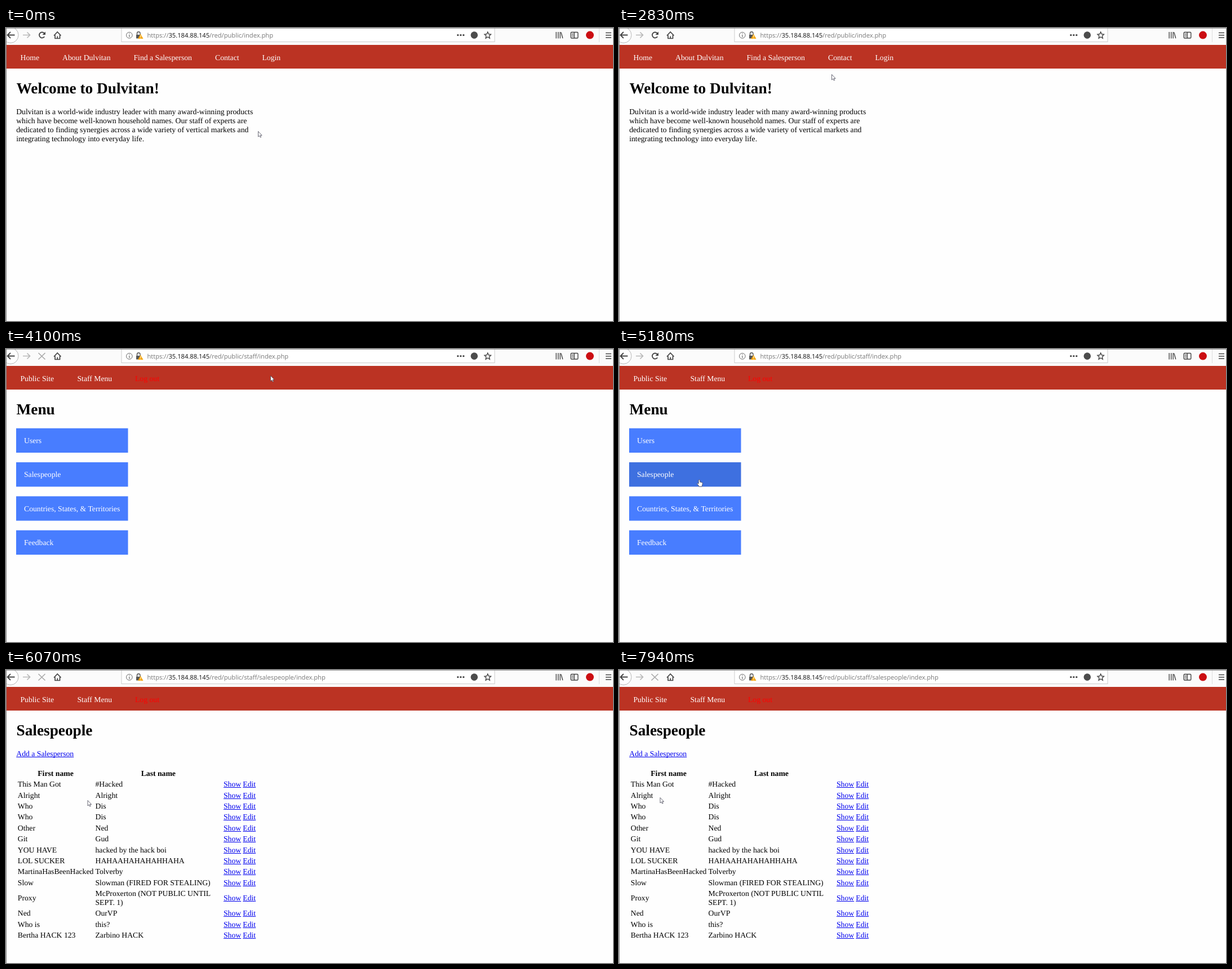
An HTML page with a canvas that plays this animation: 1077 by 520 pixels, repeating every 8000 ms.

```html
<!DOCTYPE html>
<html lang="en">
<head>
<meta charset="utf-8">
<title>Staff site walkthrough</title>
<style>
html, body { margin: 0; width: 100%; height: 100%; overflow: hidden; background: #fefefe; }
canvas { display: block; }
</style>
</head>
<body>
<canvas id="stage" width="1077" height="520"></canvas>
<script>
const ctx = document.getElementById('stage').getContext('2d');
const LOOP = 8000, STEP = 120;
const SERIF = '"Liberation Serif", serif';
const BODY = `13.7px ${SERIF}`, BOLD = `bold 13.7px ${SERIF}`, TITLE = `bold 27.3px ${SERIF}`;
const URL_FONT = '11.15px "Open Sans", sans-serif';
const INK = '#444', LINK = '#00e';

const STAFF_AT = 4100, SALES_AT = 6070;

// Pointer legs: start time, number of steps, curve control point, end point
const START = [447.5, 183.5];
const LEGS = [
  [1000, 7, 400, 150, 349.5, 119.5],
  [1840, 2, 334, 110, 317.5, 103.5],
  [2110, 3, 285, 97, 264.5, 88],
  [2470, 4, 310, 69, 377.5, 82.5],
  [2980, 5, 430, 62, 468, 48],
  [STAFF_AT, 1, 469, 48, 469.5, 47.5],
  [4220, 3, 400, 82, 328.5, 122],
  [4580, 6, 220, 185, 142.5, 232],
  [SALES_AT, 1, 144, 231, 145, 231.5],
  [6190, 3, 151, 233, 158, 234.5],
  [6680, 2, 170, 237, 178, 238],
  [6950, 6, 90, 200, 29.5, 214.5],
  [7700, 3, 50, 219, 73, 226.5]
];

const ROWS = [
  ['This Man Got', '#Hacked'], ['Alright', 'Alright'], ['Who', 'Dis'], ['Who', 'Dis'],
  ['Other', 'Ned'], ['Git', 'Gud'], ['YOU HAVE', 'hacked by the hack boi'],
  ['LOL SUCKER', 'HAHAAHAHAHAHHAHA'], ['MartinaHasBeenHacked', 'Tolverby'],
  ['Slow', 'Slowman (FIRED FOR STEALING)'],
  ['Proxy', 'McProxerton (NOT PUBLIC UNTIL', 'SEPT. 1)'],
  ['Ned', 'OurVP'], ['Who is', 'this?'], ['Bertha HACK 123', 'Zarbino HACK']
];

function pointerAt(time) {
  let [x, y] = START;
  for (const [start, steps, cx, cy, ex, ey] of LEGS) {
    if (time < start) break;
    const u = Math.min(1, (Math.floor((time - start) / STEP) + 1) / steps), v = 1 - u;
    x = v * v * x + 2 * u * v * cx + u * u * ex;
    y = v * v * y + 2 * u * v * cy + u * u * ey;
  }
  return [x, y];
}

function text(str, x, y, color = '#000', font = BODY, align = 'left') {
  ctx.font = font;
  ctx.fillStyle = color;
  ctx.textAlign = align;
  ctx.fillText(str, x, y);
}

function link(str, x, y) {
  text(str, x, y, LINK);
  rect(x, Math.round(y) + 1, ctx.measureText(str).width, 1, LINK);
}

function rect(x, y, w, h, color) {
  ctx.fillStyle = color;
  ctx.fillRect(x, y, w, h);
}

function line(path, color = INK, width = 1.6) {
  ctx.strokeStyle = color;
  ctx.lineWidth = width;
  ctx.stroke(new Path2D(path));
}

function shape(path, color) {
  ctx.fillStyle = color;
  ctx.fill(new Path2D(path));
}

function disc(x, y, r, fill, stroke) {
  ctx.beginPath();
  ctx.arc(x, y, r, 0, Math.PI * 2);
  if (fill) { ctx.fillStyle = fill; ctx.fill(); }
  if (stroke) { ctx.strokeStyle = stroke; ctx.lineWidth = 1; ctx.stroke(); }
}

function drawReload(time) {
  const arriving = (time >= 3860 && time < STAFF_AT) || (time >= 5950 && time < SALES_AT);
  const stopped = (time >= STAFF_AT && time < 4700) || time >= SALES_AT;
  if (arriving) line('M57.5 7.5L66.5 16', '#666', 1.5);
  else if (stopped) line('M57.5 7L69.5 18.5M69.5 7L57.5 18.5', '#aaa', 1.7);
  else {
    line('M68.2 15.2A5 5 0 1 1 67.6 9', INK, 1.8);
    shape('M70 6.5V12H64.5Z', INK);
  }
}

function drawUrl(time) {
  const path = time < 3860 ? '' : time < 5950 ? 'staff/' : 'staff/salespeople/';
  let x = 250.5;
  for (const [part, color] of [['https://', '#777'], ['35.184.88.145', '#111'], [`/red/public/${path}index.php`, '#777']]) {
    text(part, x, 17, color, URL_FONT);
    x += ctx.measureText(part).width;
  }
}

function drawToolbar(time) {
  rect(0, 0, 1077, 30, '#fbfbfb');
  disc(8, 12.5, 14, '#fff', '#b5b5b5');
  line('M15.5 12.5H2.5M8 7L2.5 12.5L8 18', INK, 1.8);
  line('M30 12.5H42.5M37.5 7.5L42.5 12.5L37.5 17.5', '#b8b8b8', 1.7);
  drawReload(time);
  line('M85 13.5L91.2 7L97.5 13.5M87 12.5V18.5H95.5V12.5M91.2 18.5V14.5', INK, 1.7);

  rect(204.5, 0, 663, 25, '#ccc');
  rect(205.5, 1, 661, 23, '#fff');
  disc(218.8, 12.8, 5.3, null, '#666');
  line('M218.8 12V16M218.8 9.3V10.6', '#666', 1.2);
  line('M232.5 12V9.5A2.7 2.7 0 0 1 238 9.5V12', '#555', 1.4);
  rect(231, 12, 8, 6.5, '#555');
  shape('M238.7 10.5L243.5 19H234Z', '#f5a50a');
  line('M238.8 13V16M238.8 17V18', '#fff', 1);
  drawUrl(time);
  for (const x of [801.8, 806.8, 811.8]) disc(x, 12.6, 1.7, INK);
  disc(830.8, 12.6, 6.3, '#4c4c4c');
  line('M854.7 7L856.4 10.8L860.4 11.2L857.4 14L858.3 18.2L854.7 16L851.1 18.2L852 14L849 11.2L853 10.8Z', INK, 1.4);

  line('M976.2 7V18.5M979.7 7V18.5M983.2 7V18.5M984.8 7.5L987.8 18.3', INK, 1.4);
  line('M1003.5 7.5H1013.5Q1014.8 7.5 1014.8 9V16.5Q1014.8 18 1013.5 18H1003.5Q1002.3 18 1002.3 16.5V9Q1002.3 7.5 1003.5 7.5M1008.3 7.5V18', INK, 1.4);
  line('M1004 10.2H1007M1004 12.6H1007M1004 15H1007', INK, 1);
  disc(1036, 12.6, 7, '#cb0d12');
  rect(1052, 0, 1, 25, '#ddd');
  line('M1064 8.5H1074M1064 12.7H1074M1064 16.9H1074', INK, 1.5);
}

function drawNav(items) {
  rect(0, 30, 1077, 42, '#bb3323');
  for (const [label, x, color] of items) text(label, x, 57, color || '#fff');
}

function drawHome() {
  drawNav([['Home', 25.5], ['About Dulvitan', 100], ['Find a Salesperson', 226.5], ['Contact', 371], ['Login', 454.5]]);
  text('Welcome to Dulvitan!', 18.5, 116, '#000', TITLE);
  [
    'Dulvitan is a world-wide industry leader with many award-winning products',
    'which have become well-known household names. Our staff of experts are',
    'dedicated to finding synergies across a wide variety of vertical markets and',
    'integrating technology into everyday life.'
  ].forEach((row, i) => text(row, 18.2, 153 + 16 * i));
}

function drawStaffNav() {
  drawNav([['Public Site', 25.5], ['Staff Menu', 126.5], ['Log out', 229, '#f00']]);
}

function drawMenu(hover) {
  drawStaffNav();
  text('Menu', 18.5, 116, '#000', TITLE);
  ['Users', 'Salespeople', 'Countries, States, & Territories', 'Feedback'].forEach((label, i) => {
    const y = 140.7 + 60.35 * i;
    rect(18, y, 198.5, 43.3, hover && i === 1 ? '#3e70e0' : '#487dff');
    text(label, 32, y + 26.3, '#fff');
  });
}

function drawSales() {
  drawStaffNav();
  text('Salespeople', 18.5, 116, '#000', TITLE);
  link('Add a Salesperson', 18.3, 153);
  text('First name', 88, 188, '#000', BOLD, 'center');
  text('Last name', 270.3, 188, '#000', BOLD, 'center');
  let y = 207.2;
  for (const [first, last, more] of ROWS) {
    const mid = more ? y + 7.8 : y;
    text(first, 20.8, mid);
    text(last, 158.5, y);
    if (more) text(more, 158.5, y + 15.8);
    link('Show', 386, mid);
    link('Edit', 420.3, mid);
    y += more ? 35.2 : 19.4;
  }
}

function drawPointer(x, y, hand) {
  const outline = hand
    ? 'M-1.3 7V.8Q0 -.6 1.2 .8V4L5 5Q6 5.5 5.8 7L5 10L4.6 12H-.8L-1.5 10L-4 7Q-3.8 5.4 -1.3 7Z'
    : 'M0 0V9.5L2.2 7.6L3.7 10.7L5.2 10L3.8 7H6.6Z';
  ctx.save();
  ctx.translate(x, y);
  shape(outline, '#fff');
  line(outline, '#445', 0.8);
  ctx.restore();
}

function draw() {
  const time = performance.now() % LOOP;
  const [x, y] = pointerAt(time);
  const onLogin = time < STAFF_AT && x > 454 && y < 60;
  const onSales = time >= STAFF_AT && time < SALES_AT && x < 216 && y > 201;

  ctx.textRendering = 'geometricPrecision';
  rect(0, 0, 1077, 520, '#fefefe');
  drawToolbar(time);
  if (time < STAFF_AT) drawHome();
  else if (time < SALES_AT) drawMenu(onSales);
  else drawSales();
  rect(0, 0, 1077, 1, '#999');
  rect(0, 0, 1, 520, '#888');
  drawPointer(x, y, onLogin || onSales);
  requestAnimationFrame(draw);
}
draw();
</script>
</body>
</html>
```
